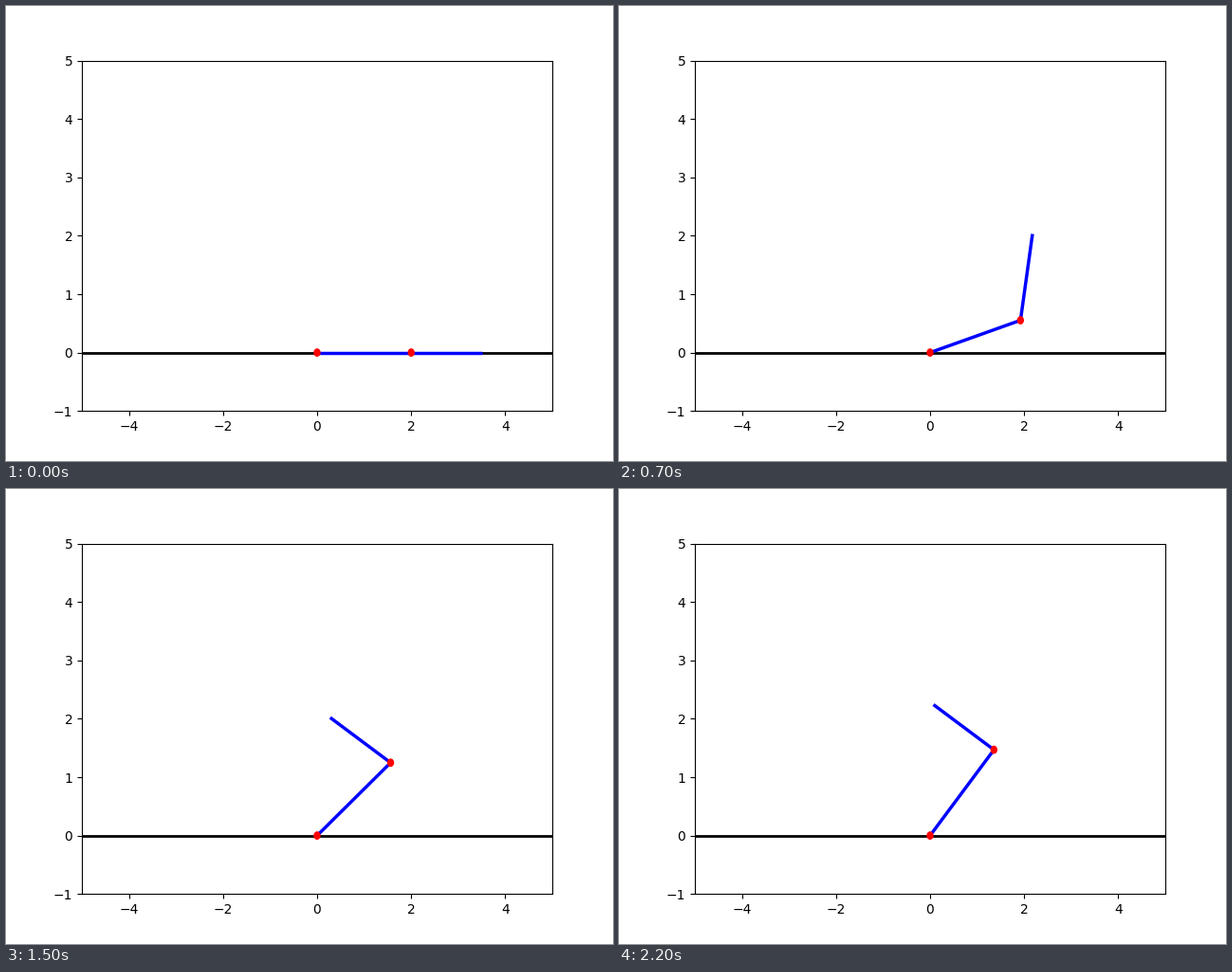
Animation, 640 px wide and 480 px high, one loop 2300 ms. Source, as a matplotlib script:

```python
import numpy as np
import matplotlib.pyplot as plt
from matplotlib.animation import FuncAnimation
from matplotlib.patches import Circle

FRAMES, INTERVAL = 23, 100
UPPER, LOWER = 2.0, 1.5

fig, ax = plt.subplots(figsize=(6.4, 4.8), dpi=100)
ax.set_xlim(-5, 5)
ax.set_ylim(-1, 5)

ax.plot([-5, 5], [0, 0], "k", lw=2)
links = [ax.plot([], [], "b", lw=2.5, solid_capstyle="butt")[0]
         for _ in range(2)]
joints = [ax.add_patch(Circle((0, 0), 0.06, color="r", zorder=4))
          for _ in range(2)]


def polar(length, angle):
    return length * np.array([np.cos(angle), np.sin(angle)])


def pose(step):
    """Absolute angles of both links: a steady raise, then one dip and return."""
    dip = max(0, 1 - ((step - 20) / 2) ** 2)
    raised = 0.04 * step + 0.016 * max(0, step - 10.4)
    return min(raised, 0.825) - 0.51 * dip, min(0.2 * step, 2.6) - 0.55 * dip


def draw(step):
    shoulder, forearm = pose(step)
    elbow = polar(UPPER, shoulder)
    tip = elbow + polar(LOWER, forearm)
    for link, a, b in zip(links, ((0, 0), elbow), (elbow, tip)):
        link.set_data([a[0], b[0]], [a[1], b[1]])
    joints[1].center = tuple(elbow)
    return links + joints


anim = FuncAnimation(fig, draw, frames=FRAMES, interval=INTERVAL,
                     init_func=lambda: draw(0), repeat=True, repeat_delay=0)
plt.show()
```
